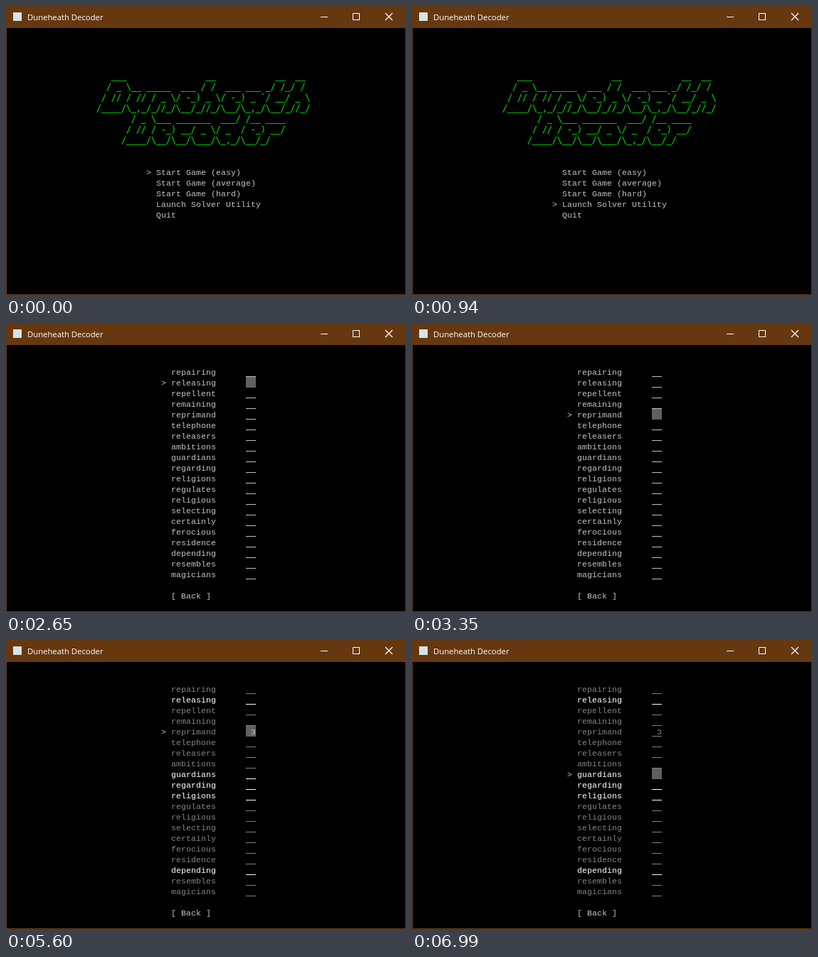
Animation, 562 px wide and 407 px high, one loop 8 s. Source, as an HTML page:

```html
<!DOCTYPE html>
<html lang="en">
<head>
<meta charset="utf-8">
<title>Duneheath Decoder</title>
<style>
  html, body { margin: 0; width: 100%; height: 100%; overflow: hidden; background: #000; }
  svg { display: block; width: 562px; height: 407px; }
  text { font: 11.667px "Liberation Mono", monospace; white-space: pre; fill: #c0c0c0; }
  .caption { font: 11.3px "Open Sans", sans-serif; fill: #fff; }
  .logo text { font: 11.627px "DejaVu Sans Mono", monospace; fill: #00c000; stroke: #00c000; stroke-width: .3px; }
  .crisp { shape-rendering: crispEdges; }

  .menu, .list, .block, .cursor, .row, .guess { animation: 8s step-end infinite; }
  .menu { animation-name: menu; }
  .list, .block { animation-name: list; }
  .cursor { animation-name: cursor; }
  .row { animation-name: rejected; }
  .row text { fill: inherit; }
  .row.match { animation-name: match; }
  .guess { animation-name: guess; }

  @keyframes menu { 0% { opacity: 1 } 16.5%, 100% { opacity: 0 } }
  @keyframes list { 0% { opacity: 0 } 16.5%, 100% { opacity: 1 } }
  @keyframes rejected { 0% { fill: #c0c0c0 } 70%, 100% { fill: #808080 } }
  @keyframes match { 0% { fill: #c0c0c0 } 70%, 100% { fill: #fff } }
  @keyframes guess {
    0% { opacity: 0; fill: #c0c0c0 }
    59.25% { opacity: 1; fill: #c0c0c0 }
    81.625%, 100% { opacity: 1; fill: #808080 }
  }
  @keyframes cursor {
    0% { transform: translate(197px, 226px) }
    5.75% { transform: translate(197px, 241px) }
    8.875% { transform: translate(197px, 256px) }
    11.75% { transform: translate(197px, 271px) }
    16.5% { transform: translate(218px, 61px) }
    33.125% { transform: translate(218px, 76px) }
    36% { transform: translate(218px, 91px) }
    39.75% { transform: translate(218px, 106px) }
    41.875% { transform: translate(218px, 121px) }
    81.625% { transform: translate(218px, 136px) }
    83.5% { transform: translate(218px, 151px) }
    86.375% { transform: translate(218px, 166px) }
    87.375%, 100% { transform: translate(218px, 181px) }
  }
</style>
</head>
<body>
<svg viewBox="0 0 562 407">
  <rect width="562" height="407" fill="#663810"/>
  <rect x="1" y="31" width="560" height="375"/>
  <rect x="10" y="9" width="12" height="12" fill="#d8e4e4"/>
  <text class="caption" x="30" y="20">Duneheath Decoder</text>
  <g fill="none" stroke="#fff">
    <path d="M442 15.5h10M487.5 10.5h9v9h-9z" class="crisp"/>
    <path d="M533 10l10 10M543 10l-10 10" stroke-width="1.3"/>
  </g>

  <g class="menu">
    <g class="logo">
      <text x="127" y="103">   ___                __            __  __</text>
      <text x="127" y="118">  / _ \__ _____  ___ / /  ___ ___ _/ /_/ /</text>
      <text x="127" y="133"> / // / // / _ \/ -_) _ \/ -_) _ `/ __/ _ \</text>
      <text x="127" y="148">/____/\_,_/_//_/\__/_//_/\__/\_,_/\__/_//_/</text>
      <text x="162" y="163">  / _ \___ _______  ___/ /__ ____</text>
      <text x="162" y="178"> / // / -_) __/ _ \/ _  / -_) __/</text>
      <text x="162" y="193">/____/\__/\__/\___/\_,_/\__/_/</text>
    </g>
    <text x="211" y="238">Start Game (easy)</text>
    <text x="211" y="253">Start Game (average)</text>
    <text x="211" y="268">Start Game (hard)</text>
    <text x="211" y="283">Launch Solver Utility</text>
    <text x="211" y="298">Quit</text>
  </g>

  <g class="list">
    <g id="rows"></g>
    <text x="232" y="388">[ Back ]</text>
  </g>

  <g class="cursor">
    <text y="12">&gt;</text>
    <rect class="block crisp" x="119" width="14" height="15" fill="#606060"/>
  </g>
  <text class="guess" x="344" y="133">3</text>
</svg>
<script>
  const words = `repairing releasing repellent remaining reprimand telephone releasers
    ambitions guardians regarding religions regulates religious selecting certainly
    ferocious residence depending resembles magicians`.split(/\s+/);
  const matches = ['releasing', 'guardians', 'regarding', 'religions', 'depending'];

  document.getElementById('rows').innerHTML = words.map((word, i) => {
    const top = 61 + 15 * i;
    return `<g class="row ${matches.includes(word) ? 'match' : ''}">
      <text x="232" y="${top + 12}">${word}</text>
      <rect class="crisp" x="337" y="${top + 14}" width="14" height="1"/>
    </g>`;
  }).join('');
</script>
</body>
</html>
```
